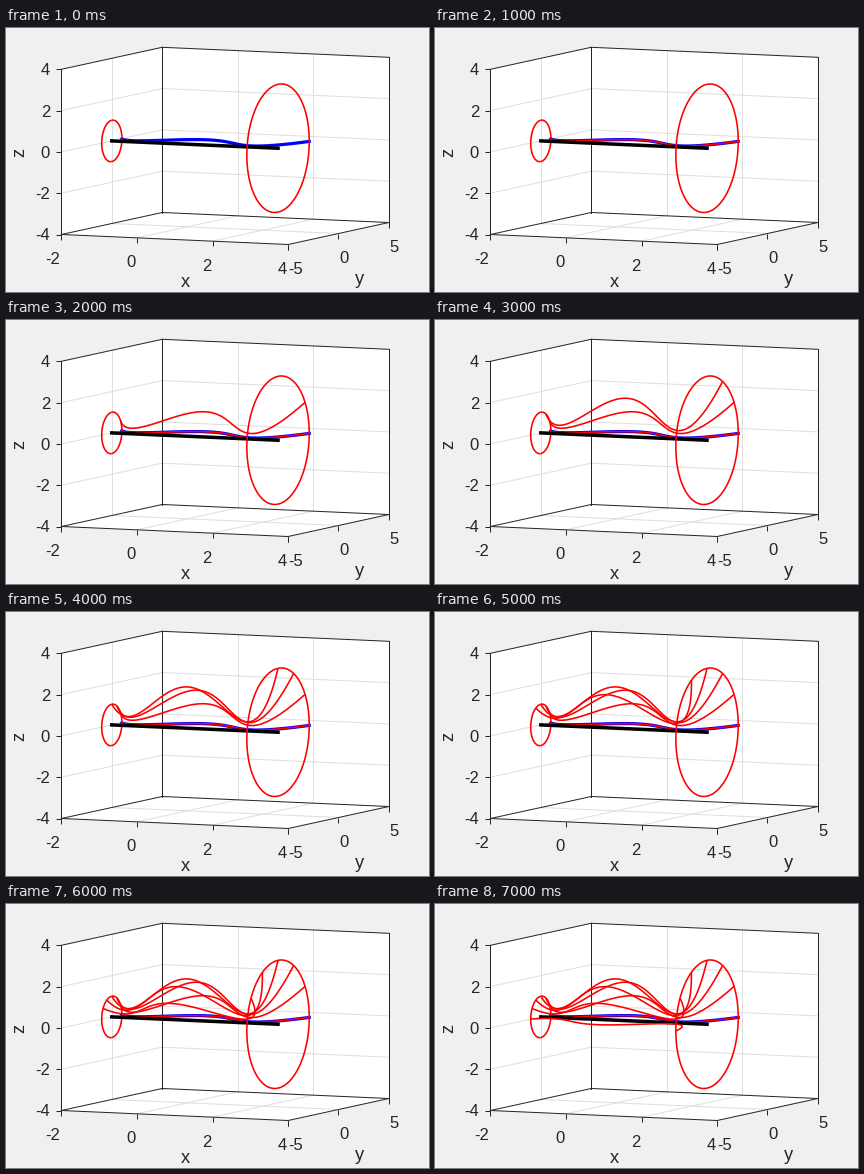
These frames come from a looping animation (423x264 px, 8 s). A matplotlib script:

```python
import numpy as np
import matplotlib.pyplot as plt
from matplotlib.animation import FuncAnimation

W, H, DPI = 423, 264, 72   # at 72 dpi one point is one pixel
INK, GRID = "#262626", "#dedede"
X0, X1 = -2, 2.4           # extent of the solid of revolution
BACK, AXIS, FRONT = 4, 5, 6  # drawing order by depth

plt.rcParams["font.family"] = "Liberation Sans"
fig = plt.figure(figsize=(W / DPI, H / DPI), dpi=DPI, facecolor="#f0f0f0")
ax = fig.add_axes([0, 0, 1, 1])
ax.set_xlim(0, W)
ax.set_ylim(H, 0)
ax.axis("off")


def project(x, y, z):
    """Orthographic view of the 3D box, in pixels."""
    px = 55.4 + (x + 2) * 37.78 + (y + 5) * 10.08
    py = 206.5 + (x + 2) * 1.667 - (y + 5) * 2.2 - (z + 4) * 20.65
    return px, py


def line(x, y, z, color, width, order, cap="projecting"):
    px, py = project(*np.broadcast_arrays(x, y, z))
    return ax.plot(px, py, color=color, lw=width, zorder=order,
                   solid_capstyle=cap, solid_joinstyle="round")[0]


def segments(points, color, order):
    """Thin lines drawn one by one, so upright ones stay crisp."""
    for pair in zip(points, points[1:]):
        line(*np.array(pair, float).T, color, 1, order)


def tick(p, dx, dy):
    px, py = project(*p)
    ax.plot([px, px + dx], [py, py + dy], color=INK, lw=1, zorder=2,
            solid_capstyle="butt")
    return px, py


def label(x, y, text, size=16.67, **style):
    ax.text(x, y, text, size=size, color=INK, va="baseline", **style)


def radius(x):
    return (x**4 - 5 * x**2 + 8) / 4


# White walls and floor
walls = [
    [(-2, -5, -4), (-2, 5, -4), (-2, 5, 4), (-2, -5, 4)],
    [(-2, 5, -4), (4, 5, -4), (4, 5, 4), (-2, 5, 4)],
    [(-2, -5, -4), (4, -5, -4), (4, 5, -4), (-2, 5, -4)],
]
edges = set()
for wall in walls:
    ax.fill(*project(*np.array(wall, float).T), color="white", lw=0, zorder=0)
    edges |= {tuple(sorted(e)) for e in zip(wall, wall[1:] + wall[:1])}
for edge in sorted(edges):
    segments(edge, INK, 2)

# Grid
for z in (-2, 0, 2):
    segments([(-2, -5, z), (-2, 5, z), (4, 5, z)], GRID, 1)
for x in (0, 2):
    segments([(x, -5, -4), (x, 5, -4), (x, 5, 4)], GRID, 1)
segments([(4, 0, -4), (-2, 0, -4), (-2, 0, 4)], GRID, 1)

# Ticks and labels
for z in range(-4, 5, 2):
    px, py = tick((-2, -5, z), -5, 0)
    label(44, py + 6, str(z), ha="right")
for x in range(-2, 5, 2):
    px, py = tick((x, -5, -4), 0, 5)
    label(px - 1, py + 29.5, str(x), ha="right")
for y in (-5, 0, 5):
    px, py = tick((4, y, -4), 0, 5)
    label(px + 0.6, py + 29.5, str(y), ha="left")
label(179.4, 259, "x", 18.3, ha="center")
label(353.3, 256, "y", 18.3, ha="center")
ax.text(13.5, 124.5, "z", size=18.3, color=INK, rotation=90,
        ha="center", va="center")

# End circles, far half behind the axis and near half before it
for x in (X0, X1):
    r = radius(x)
    for start, order in ((-90, BACK), (90, FRONT)):
        t = np.radians(np.linspace(start, start + 180, 80))
        line(x, r * np.cos(t), r * np.sin(t), "red", 1.6, order, "butt")

# Generating curve and axis of rotation
xs = np.linspace(X0, X1, 120)
rs = radius(xs)
line(xs, rs, 0, "blue", 3.2, 3)
line(np.array([X0, X1]), 0, 0, "black", 3.5, AXIS)

# Meridians, one every 30 degrees
meridians = []
for deg in range(0, 181, 30):
    t = np.radians(deg)
    order = BACK if deg < 90 else FRONT
    meridians.append(line(xs, rs * np.cos(t), rs * np.sin(t),
                          "red", 1.6, order, "butt"))


def update(frame):
    for i, curve in enumerate(meridians):
        curve.set_visible(i < frame)
    return meridians


anim = FuncAnimation(fig, update, frames=8, interval=1000, repeat=True)
plt.show()
```
